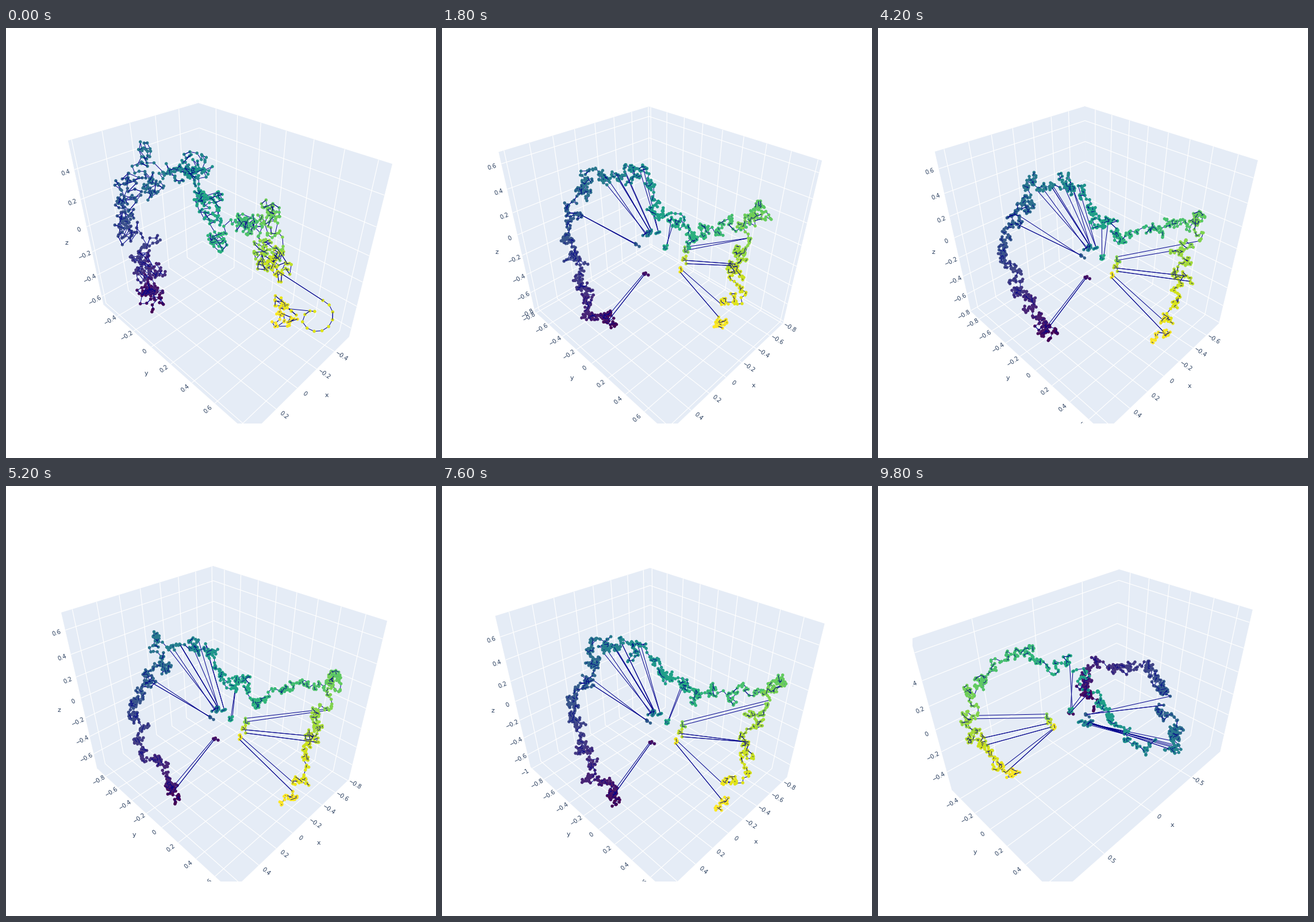
A matplotlib script that plays this animation: 748 by 748 pixels, repeating every 10000 ms.

```python
import numpy as np
import matplotlib.pyplot as plt
from matplotlib.animation import FuncAnimation
from matplotlib.collections import LineCollection, PolyCollection

SIZE, DPI = 748, 100
PX = 72 / DPI
LEFT, RIGHT, TOP, BOTTOM = 60, 688, 75, 688
CX, CY, FOCAL = 374, 381.5, 740
EYE = 1.25 * np.sqrt(3)
FRAMES, INTERVAL = 50, 200
OPEN_MS, WIDE_MS, FLIP_MS = 800, 6200, 8000

N = 1000
T = np.linspace(0, 1, N)
COLORS = plt.get_cmap("viridis")(T)
WALL, INK, NAVY = "#e5ecf6", "#2a3f5f", "#00008b"

# where short runs of the chain are drawn in towards the hub
SPIKES = [0.04, 0.305, 0.42, 0.44, 0.46, 0.505, 0.6, 0.81, 0.9, 0.97]
RUN = 5

# axis limits (x, y, z) at a few times
LIMIT_MS = [0, 800, 2800, 4200, 6200, 7600]
LIMITS = np.array([
    [-.581, .421, -.576, .874, -.680, .578],
    [-.814, .595, -.795, .768, -.859, .690],
    [-.799, .684, -.851, .885, -.790, .684],
    [-.798, .670, -.934, .744, -.813, .730],
    [-.836, .700, -.954, .774, -.740, .740],
    [-.887, .711, -1.028, .760, -.755, .770],
])
TURNED_LIMITS = np.array([-.934, .918, -.524, .700, -.590, .693])


def points(*xy):
    return np.array(xy, float)


# backbones of the chain, evenly spaced from its start to its end
COIL = points((255, 482), (240, 440), (245, 395), (210, 340), (212, 275),
              (265, 242), (330, 245), (360, 305), (400, 360), (450, 330),
              (455, 390), (464, 430), (472, 492))
RING = points((295, 510), (262, 490), (245, 435), (215, 380), (222, 300),
              (275, 262), (345, 250), (380, 330), (450, 358), (525, 310),
              (510, 380), (510, 430), (480, 500))
WIDE = points((295, 555), (280, 510), (240, 450), (225, 385), (262, 330),
              (275, 280), (345, 290), (404, 342), (470, 368), (575, 340),
              (550, 400), (530, 470), (480, 550))
TURNED = points((375, 385), (355, 330), (430, 305), (490, 335), (495, 395),
                (520, 445), (440, 440), (372, 345), (270, 293), (170, 345),
                (160, 410), (180, 460), (235, 490))

rng = np.random.default_rng(11)


def chain_noise(keep=0.92):
    """Random walk that is pulled back to zero."""
    walk = rng.normal(size=(N, 2))
    for i in range(1, N):
        walk[i] += keep * walk[i - 1]
    return walk


NOISE = [chain_noise() for _ in range(3)]
FUZZ = rng.normal(0, 2.8, (N, 2))
ON_TOP = rng.random(N - 1) < 0.28


def smooth(ctrl):
    """Catmull-Rom curve through the control points, one point per bead."""
    p = np.vstack([2 * ctrl[0] - ctrl[1], ctrl, 2 * ctrl[-1] - ctrl[-2]])
    u = T * (len(ctrl) - 1)
    i = np.minimum(u.astype(int), len(ctrl) - 2)
    f = (u - i)[:, None]
    a, b, c, d = (p[i + k] for k in range(4))
    return b + f / 2 * (c - a + f * (2 * a - 5 * b + 4 * c - d
                                     + f * (3 * (b - c) + d - a)))


def mix(a, b, k):
    return a + (b - a) * k


def make_chain(ms):
    opened = min(ms / OPEN_MS, 1)
    widened = np.clip((ms - OPEN_MS) / (WIDE_MS - OPEN_MS), 0, 1)
    decay = np.exp(-ms / OPEN_MS)

    if ms < FLIP_MS:
        path = smooth(mix(mix(COIL, RING, opened), WIDE, widened))
        hub = np.array([385, 390 + 35 * widened])
    else:
        path = smooth(TURNED)
        hub = np.array([330, 405])

    phase = 4 * np.pi * ms / (FRAMES * INTERVAL)
    walk = 0.8 * NOISE[0] + 0.6 * (NOISE[1] * np.cos(phase) + NOISE[2] * np.sin(phase))
    chain = path + (3.8 + 3.2 * decay) * walk

    pull = 0.2 + 0.8 * decay
    for t in SPIKES:
        run = slice(int(t * N), int(t * N) + RUN)
        tip = mix(hub, path[int(t * N)], pull) + FUZZ[run]
        chain[run] = mix(tip, chain[run], max(1 - 3 * (1 - pull), 0))

    # loose loop near the end, drawn in as the coil opens
    turn = np.linspace(-1.2, 4.2, 12)
    radius = 28 - 20 * np.clip((turn - 2.7) / 1.5, 0, 1)
    loop = np.array([541, 500]) + radius[:, None] * np.column_stack(
        [np.cos(turn), np.sin(turn)])
    run = slice(int(0.94 * N), int(0.94 * N) + len(turn))
    chain[run] = mix(loop, chain[run], opened)
    return chain


def limits_at(ms):
    if ms >= FLIP_MS:
        return TURNED_LIMITS.reshape(3, 2)
    return np.array([np.interp(ms, LIMIT_MS, col) for col in LIMITS.T]).reshape(3, 2)


def project(x, y, z):
    """Perspective view from (1, 1, 1) to pixels."""
    depth = EYE - (x + y + z) / np.sqrt(3)
    right = (y - x) / np.sqrt(2)
    up = (2 * z - x - y) / np.sqrt(6)
    return np.array([CX + FOCAL * right / depth, CY - FOCAL * up / depth])


def ticks(lo, hi):
    step = 0.5 if hi - lo > 1.8 else 0.2
    return np.arange(np.ceil(lo / step), np.floor(hi / step) + 1) * step


def label(at, text, size, angle=0):
    ax.text(at[0], at[1], text, fontsize=size * PX, color=INK, rotation=angle,
            ha="center", va="center", clip_on=True, zorder=3)


def draw_box(limits):
    span = limits[:, 1] - limits[:, 0]
    scale = 1 / np.prod(span) ** (1 / 3)
    hx, hy, hz = span * scale / 2
    mid = limits.mean(axis=1)

    walls = [[(-hx, -hy, -hz), (hx, -hy, -hz), (hx, hy, -hz), (-hx, hy, -hz)],
             [(-hx, -hy, -hz), (hx, -hy, -hz), (hx, -hy, hz), (-hx, -hy, hz)],
             [(-hx, -hy, -hz), (-hx, hy, -hz), (-hx, hy, hz), (-hx, -hy, hz)]]
    ax.add_collection(PolyCollection(
        [[project(*p) for p in wall] for wall in walls],
        facecolors=WALL, edgecolors=WALL, linewidths=0.3, zorder=0))

    # each rule gives the grid polyline and the outward label place for a tick
    rules = [
        (lambda v: [(v, -hy, hz), (v, -hy, -hz), (v, hy, -hz)],
         lambda v, e: (v, hy + e, -hz)),
        (lambda v: [(-hx, v, hz), (-hx, v, -hz), (hx, v, -hz)],
         lambda v, e: (hx + e, v, -hz)),
        (lambda v: [(hx, -hy, v), (-hx, -hy, v), (-hx, hy, v)],
         lambda v, e: (hx + e, -hy, v)),
    ]
    grid = []
    for k, (line, place) in enumerate(rules):
        for value in ticks(*limits[k]):
            v = (value - mid[k]) * scale
            grid.append([project(*p) for p in line(v)])
            inner, outer = project(*place(v, 0)), project(*place(v, 0.045))
            dx, dy = outer - inner if k == 0 else inner - outer
            text = f"{round(value, 1) + 0:g}".replace("-", "\u2212")
            label(outer, text, 10, -np.degrees(np.arctan2(dy, dx)))
        label(project(*place(0, 0.125)), "xyz"[k], 11)
    ax.add_collection(LineCollection(grid, colors="white",
                                     linewidths=1.2 * PX, zorder=1))


def draw(frame):
    ax.clear()
    ax.set_xlim(LEFT, RIGHT)
    ax.set_ylim(BOTTOM, TOP)
    ax.axis("off")
    ms = frame * INTERVAL
    draw_box(limits_at(ms))

    chain = make_chain(ms)
    links = np.stack([chain[:-1], chain[1:]], axis=1)
    ax.add_collection(LineCollection(links, colors=NAVY, linewidths=PX, zorder=4))
    ax.scatter(chain[:, 0], chain[:, 1], s=(5.5 * PX) ** 2, c=COLORS,
               linewidths=0, zorder=5)
    ax.add_collection(LineCollection(links[ON_TOP], colors=NAVY,
                                     linewidths=0.9 * PX, zorder=6))
    return []


plt.rcParams["font.family"] = "DejaVu Sans"
fig = plt.figure(figsize=(SIZE / DPI, SIZE / DPI), dpi=DPI, facecolor="white")
ax = fig.add_axes([LEFT / SIZE, 1 - BOTTOM / SIZE,
                   (RIGHT - LEFT) / SIZE, (BOTTOM - TOP) / SIZE])

anim = FuncAnimation(fig, draw, frames=FRAMES, interval=INTERVAL,
                     repeat=True, repeat_delay=0, blit=False)
plt.show()
```
